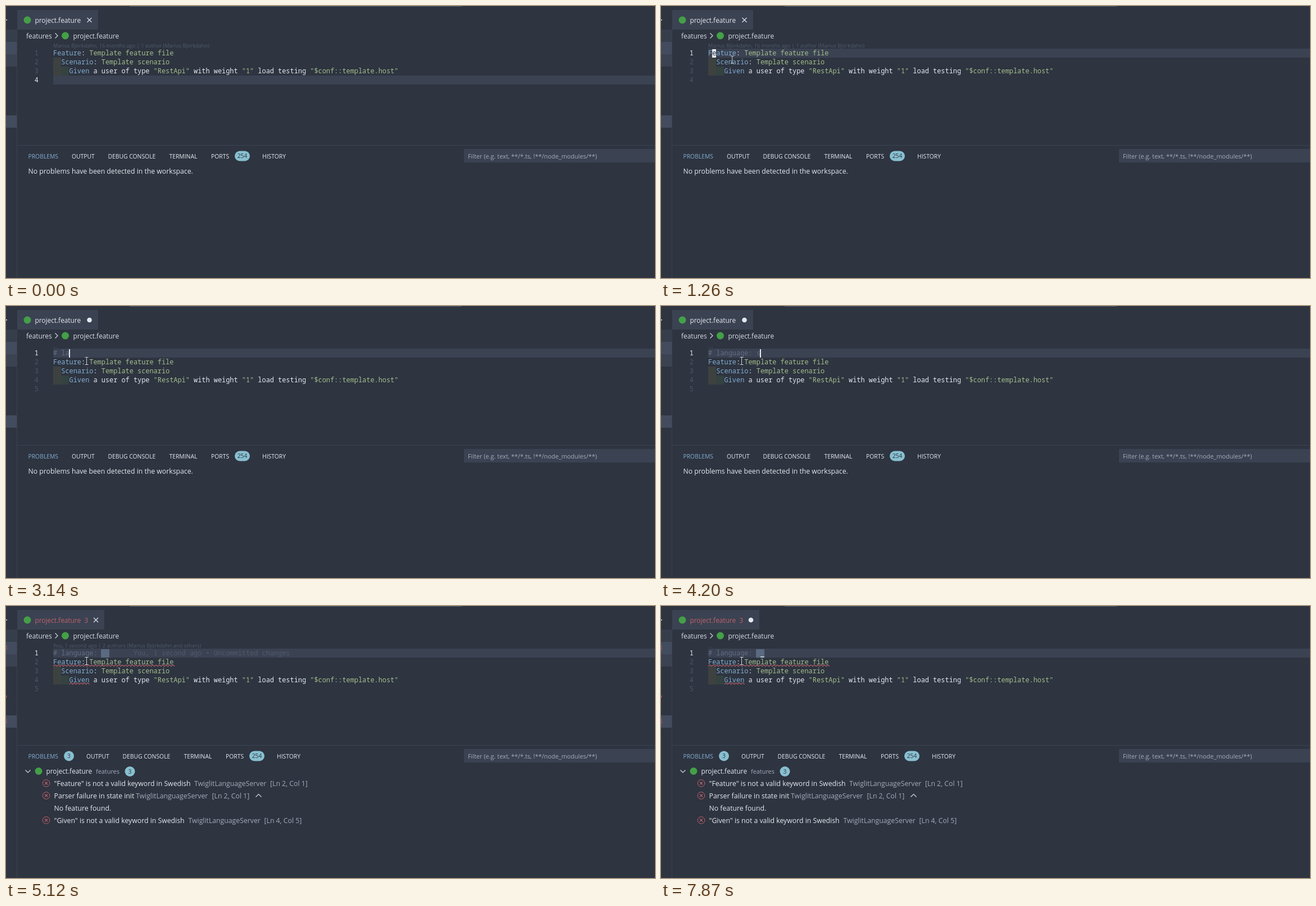
An HTML page for the animation above (8000 ms loop, 1155 px wide and 485 px high).

```html
<!DOCTYPE html>
<html lang="en">
<head>
<meta charset="utf-8">
<title>Editor</title>
<style>
  html, body { margin: 0; width: 100%; height: 100%; overflow: hidden; background: #2e3440; }
  svg { display: block; }
  text { font-family: "Open Sans", "Noto Sans", sans-serif; font-size: 11.85px; white-space: pre; }
  .code { font-family: "Noto Sans Mono", "DejaVu Sans Mono", monospace; font-size: 11.91px; font-weight: 500; }
  .message { font-size: 12.25px; }
  .lens { font-size: 9.29px; }
  .caps { font-size: 10.35px; }
  .small { font-size: 10.9px; }
</style>
</head>
<body>
<svg id="stage" width="1155" height="485" viewBox="0 0 1155 485"></svg>
<script>
const LOOP = 8000, CHAR = 7.145, LEFT = 84, TOP = 76, ROW = 16;
const C = {
  bg: '#2e3440', raised: '#3b4252', select: '#434c5e', dim: '#4c566a', ghost: '#505a6e',
  comment: '#616e88', text: '#e5e9f0', soft: '#d8dee9', muted: '#a4abb8',
  blue: '#81add0', green: '#a3be8c', badge: '#88c0d0', red: '#bf616a', darkRed: '#97525c', icon: '#43a047'
};
const AUTHOR = 'Marius Björkdahn', SERVER = 'TwiglitLanguageServer';

// [start ms, value] lists: the latest entry that has started applies
const at = (list, t) => list.filter(e => e[0] <= t).pop();

const PHRASE = '# language: sv';
const KEYS = [2540, 2860, 3000, 3140, 3260, 3400, 3540, 3600, 3680, 3740, 4000, 4080, 4200, 4280];
const CURSOR = [
  [0, ''], [980, 'block', 0], [1140, 'block', 1], [1600, ''], [2000, 'bar'],
  [4360, 'block', 13], [4440, 'under', 13], [4520, 'block', 13], [5060, ''],
  [5520, 'block', 13], [6060, ''], [6200, 'block', 13], [6400, 'block', 12],
  [6480, 'block', 11], [6680, 'bar'], [7330, 'block', 13], [7810, ''], [7870, 'under', 13]
];
const LENS = [
  [0, `${AUTHOR}, 16 months ago | 1 author (${AUTHOR})`], [2660, '...'],
  [5060, `You, 1 second ago | 2 authors (${AUTHOR} and others)`], [7530, '...']
];
const BLAME = [
  [0, ''], [1320, `${AUTHOR}, 16 months ago • actual initial commit …`], [2060, ''],
  [5120, 'You, 1 second ago • Uncommitted changes'], [6400, '']
];

const rect = (x, y, w, h, fill, extra = '') =>
  `<rect x="${x}" y="${y}" width="${w}" height="${h}" fill="${fill}" ${extra}/>`;
const text = (x, y, s, fill, cls = '', anchor = 'start') =>
  `<text x="${x}" y="${y}" fill="${fill}" class="${cls}" text-anchor="${anchor}">${s}</text>`;
const line = (d, stroke, w = 1, extra = '') =>
  `<path d="${d}" fill="none" stroke="${stroke}" stroke-width="${w}" ${extra}/>`;
const dot = (x, y, r, fill) => `<circle cx="${x}" cy="${y}" r="${r}" fill="${fill}"/>`;
const cross = (x, y, r, color) =>
  line(`M${x - r} ${y - r}l${2 * r} ${2 * r}M${x + r} ${y - r}l${-2 * r} ${2 * r}`, color, 1.1);
const badge = (x, y, w, s) =>
  rect(x - w / 2, y - 9, w, 18, C.badge, 'rx="9"') + text(x, y + 3.8, s, C.bg, 'caps', 'middle');
const colX = col => LEFT + col * CHAR;
const rowY = row => TOP + row * ROW;
const code = (col, row, parts) => text(colX(col), rowY(row) + 12,
  parts.map(([s, fill]) => `<tspan fill="${fill}">${s}</tspan>`).join(''), C.text, 'code');
const squiggle = (col, row, len) =>
  line(`M${colX(col)} ${rowY(row) + 15.5}` + 'l3 -2.4 3 2.4'.repeat(Math.round(len * CHAR / 6)), C.red, 1.1);

function typed(t) {
  if (t >= 6400) return PHRASE.slice(0, t < 6480 ? 13 : t < 6940 ? 12 : t < 7080 ? 13 : 14);
  return PHRASE.slice(0, KEYS.filter(k => k <= t).length);
}

function frameParts(failed) {
  let s = rect(0, 42, 19, 22, '#363d4b') + rect(0, 64, 19, 22, C.select) +
    rect(0, 86, 19, 22, C.raised) + rect(0, 195, 19, 22, C.select) +
    rect(0, 24, 2, 1.5, C.soft) + rect(19, 42, 1, 443, C.raised) +
    rect(220, 0, 591, 1, '#596070') + rect(20, 248, 1135, 1, C.raised);
  if (failed) s += text(-4, 79, '3', C.darkRed) + text(-4, 210, '3', C.darkRed) + dot(-1, 161.5, 2.6, C.darkRed);
  return s;
}

function header(failed, dirty) {
  const end = failed ? 160 : 148.5;
  return rect(20, 7, failed ? 155 : 144, 35, C.raised) + dot(38, 25, 6.5, C.icon) +
    text(51.5, 29.5, 'project.feature', failed ? C.red : C.text) +
    (failed ? text(139.5, 29.5, '3', C.red) : '') +
    (dirty ? dot(end, 25, 4.3, C.text) : cross(end, 25, 4, C.text)) +
    text(36, 57.5, 'features', C.soft) + line('M87.5 48.5l4.5 4.5-4.5 4.5', C.soft, 1.1) +
    dot(105.5, 53, 6.5, C.icon) + text(119.5, 57.5, 'project.feature', C.soft);
}

function editor(t) {
  const added = t >= 2000, shift = added ? 1 : 0, current = t < 1140 ? 3 : 0;
  const first = typed(t), [, kind, pos] = at(CURSOR, t);
  const marked = (t >= 4720 && t < 6400) || t >= 7610;
  const raw = t >= 2000 && t < 2060;
  let s = rect(LEFT, rowY(current), 1155 - LEFT, ROW, C.raised);

  for (let i = 0; i < 4 + shift; i++)
    s += text(58, rowY(i) + 12, i + 1, i === current ? C.text : C.dim, 'code', 'end');
  for (const i of [1, 2]) s += rect(LEFT, rowY(i + shift), 14, ROW, '#3d4240');
  s += rect(98, rowY(2 + shift), 14, ROW, '#344240');
  s += text(LEFT, 73.5, at(LENS, t)[1], C.ghost, 'lens');

  if (first) s += code(0, 0, [[first, C.comment]]);
  if (marked) s += rect(169, 77, 15, 15, '#5d6e85', 'opacity=".9"');
  s += code(0, shift, [['Feature', raw ? C.text : C.blue], [': ', C.text],
    ['Template feature file', raw ? C.text : C.green]]);
  s += code(2, 1 + shift, [['Scenario', C.blue], [': ', C.text], ['Template scenario', C.green]]);
  s += code(4, 2 + shift, [['Given', C.blue], [' a user of type ', C.text], ['"RestApi"', C.green],
    [' with weight ', C.text], ['"1"', C.green], [' load testing ', C.text],
    ['"$conf::template.host"', C.green]]);

  const blame = at(BLAME, t)[1];
  if (blame) s += code(t < 4000 ? 36 : 20, t < 4000 ? shift : 0, [[blame, C.ghost]]);
  if (t >= 4650) s += squiggle(0, 1, 30) + squiggle(4, 3, 5);

  const y = rowY(current);
  if (kind === 'bar') s += rect(Math.round(colX(first.length) - .4), y + 1, 2, 15, C.text);
  if (kind === 'under') s += rect(colX(pos), y + 14, 7, 1.5, C.soft);
  if (kind === 'block') {
    const under = (current ? '' : added ? first : 'Feature')[pos];
    s += rect(Math.floor(colX(pos)), y + 1, 7, 15, C.text);
    if (under) s += code(pos, 0, [[under, C.bg]]);
  }
  return s;
}

function problem(y, message, x1, x2, place) {
  return `<circle cx="71.5" cy="${y}" r="6.3" fill="none" stroke="${C.red}"/>` + cross(71.5, y, 2.5, C.red) +
    text(85.5, y + 4.5, message, C.text, 'message') + text(x1, y + 4.5, SERVER, C.muted, 'message') +
    text(x2, y + 4.5, place, C.muted, 'message');
}

function panel(failed) {
  const dx = failed ? 26 : 0;
  let s = text(39.5, 271.5, 'PROBLEMS', C.blue, 'caps');
  const tabs = [[117, 'OUTPUT'], [181.5, 'DEBUG CONSOLE'], [290.5, 'TERMINAL'], [365, 'PORTS'], [456, 'HISTORY']];
  for (const [x, label] of tabs) s += text(x + dx, 271.5, label, C.text, 'caps');
  s += badge(420.5 + dx, 267.5, 27, '254') + rect(815, 255, 340, 24, C.raised) +
    text(822, 272, 'Filter (e.g. text, **/*.ts, !**/node_modules/**)', C.muted, 'small');
  if (!failed) return s + text(39.5, 299, 'No problems have been detected in the workspace.', C.text, 'message');
  return s + badge(112, 267.5, 18, '3') +
    line('M34.5 292.5l4.5 4.5 4.5-4.5', C.soft, 1.1) + dot(58, 294.5, 6.5, C.icon) +
    text(71.5, 299, 'project.feature', C.text) + text(160, 299, 'features', C.muted, 'small') +
    badge(220.5, 295, 18, '3') +
    problem(316, '"Feature" is not a valid keyword in Swedish', 335, 470, '[Ln 2, Col 1]') +
    problem(338, 'Parser failure in state init', 231, 366.5, '[Ln 2, Col 1]') +
    line('M444.5 340.5l5-5 5 5', C.soft, 1.1) +
    text(85.5, 364.5, 'No feature found.', C.text, 'message') +
    problem(382, '"Given" is not a valid keyword in Swedish', 324.5, 459.5, '[Ln 4, Col 5]');
}

function pointer(t) {
  if (t < 70) return '';
  let x, y;
  if (t < 1200) {
    const p = Math.min(1, Math.floor((t - 70) / 65.8) / 12);
    const e = p * p * (3 - 2 * p);
    x = 960 + (93.5 - 960) * e;
    y = 461 + (91 - 461) * e;
  } else {
    const p = Math.min(1, (Math.floor((t - 1200) / 60) + 1) / 3);
    x = 93.5 + 50 * p;
    y = 91 + 7 * p;
  }
  const halo = t >= 980 && t < 1200 ? `<circle cx="91.5" cy="88" r="12" fill="#c4b80c" opacity=".8"/>` : '';
  const move = `transform="translate(${x.toFixed(1)} ${y.toFixed(1)})"`;
  if (y > 250)
    return `<path d="M0 0v16l3.8-3.6 2.6 6 2.4-1-2.6-5.9h5.3z" fill="#fff" stroke="#000" stroke-width=".8" ${move}/>`;
  const beam = 'M-3 -6.5h6M0 -6.5v13M-3 6.5h6';
  return halo + line(beam, '#20242c', 2.4, move + ' opacity=".5"') + line(beam, '#d5d9e0', 1, move);
}

const stage = document.getElementById('stage');
let shown = '';
function draw() {
  const t = performance.now() % LOOP;
  const failed = t >= 4580, dirty = (t >= 2000 && t < 4520) || t >= 6400;
  const markup = frameParts(failed) + header(failed, dirty) + editor(t) + panel(failed) + pointer(t);
  if (markup !== shown) stage.innerHTML = shown = markup;
  requestAnimationFrame(draw);
}
draw();
</script>
</body>
</html>
```
